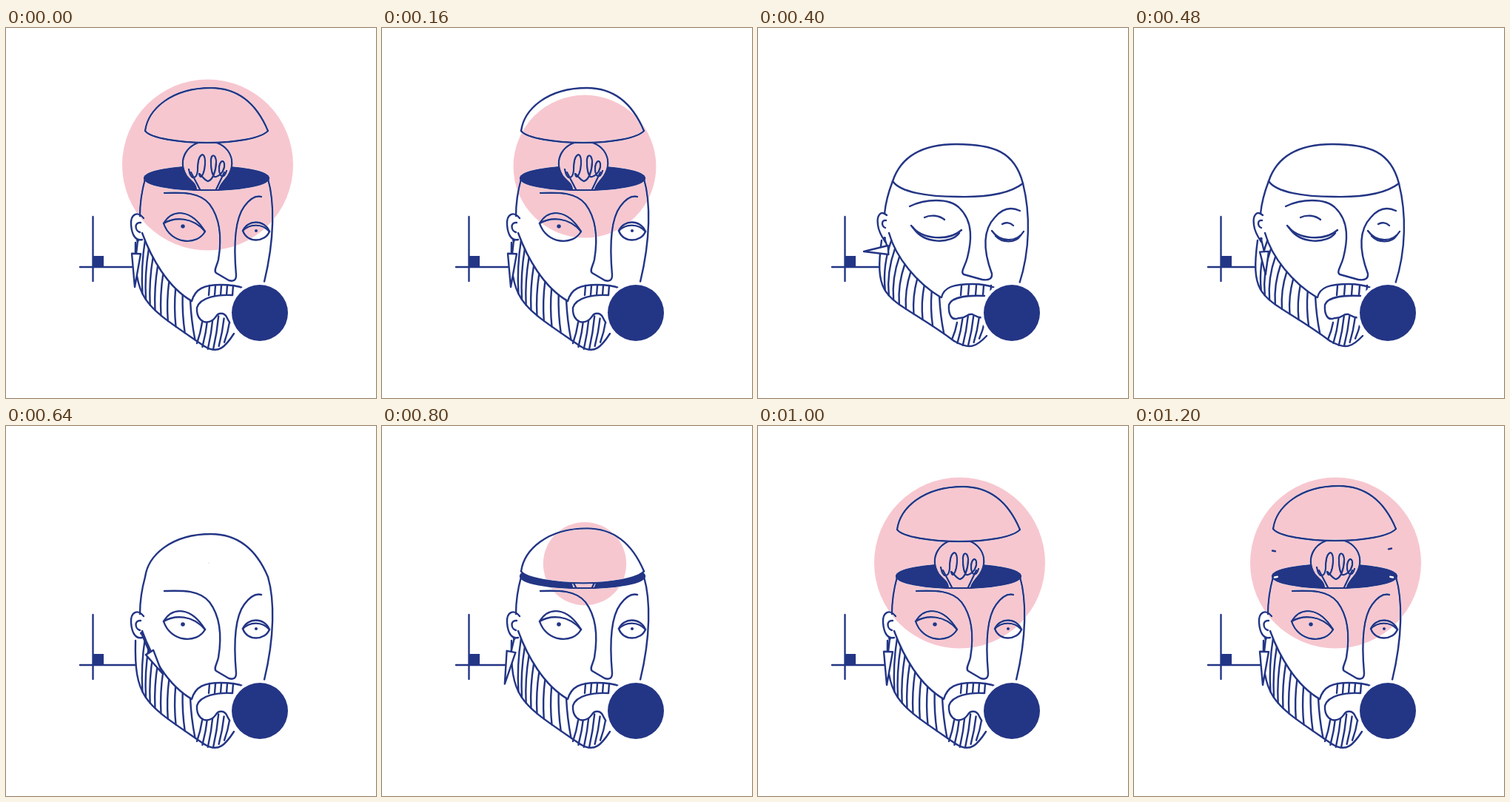
An HTML page with a canvas for the animation above (1.24 s loop, 500x500 px).

```html
<!DOCTYPE html>
<html lang="en">
<head>
<meta charset="utf-8">
<title>Open mind</title>
<style>
html, body { margin: 0; width: 100%; height: 100%; overflow: hidden; background: #fff; }
canvas { display: block; width: 500px; height: 500px; }
</style>
</head>
<body>
<canvas id="stage" width="500" height="500"></canvas>
<script>
const ctx = document.getElementById('stage').getContext('2d');
const NAVY = '#233585', PINK = '#f7c7d0', WHITE = '#fff';
const LOOP = 1240, STEP = 40;

const lerp = (a, b, k) => a + (b - a) * k;
const span = (t, a, b) => Math.min(1, Math.max(0, (t - a) / (b - a)));
const smooth = k => k * k * (3 - 2 * k);
const inOut = k => k < 0.5 ? 2 * k * k : 1 - 2 * (1 - k) * (1 - k);

// Path between two outlines that share the same commands.
function blend(a, b, k) {
  const to = b.match(/[\d.]+/g);
  let i = 0;
  return new Path2D(a.replace(/[\d.]+/g, n => lerp(+n, +to[i++], k)));
}

// [head raised, head lowered]
const DOME = ['M188 139C192 110 223 81 277 81C318 81 341 108 354 139',
              'M182 142C194 106 226 92 268 92C318 92 347 102 358 145'];
const SEAM = ['C345 149 310 155 272 155C235 155 195 149 188 139',
              'C340 159 310 164 270 163C230 163 192 157 182 142'];
const RIM = ['M354 139', 'M358 145'];
const LINES = [
  // sides of the face
  ['M188 204C183 222 181 240 181 254', 'M182 207C175 225 172 240 171 251'],
  ['M354 204C363 235 363 285 349 343', 'M358 210C368 250 368 300 353 346'],
  // brows and nose
  ['M214 223C240 222 262 222 275 238C293 262 290 295 287 313C285 322 280 328 284 331L301 341Q311 344 311 334C308 300 308 260 322 241Q334 225 345 228',
   'M205 241C225 231 258 229 272 243C292 262 288 290 283 310C280 322 273 330 278 333L303 340Q317 342 316 332C306 305 302 275 320 256Q335 238 354 247'],
  // left eye
  ['M213 264C225 244 250 244 269 275', 'M225 256C233 252 245 253 252 259'],
  ['M213 264C228 255 252 255 269 275', 'M207 267C222 287 258 288 275 273'],
  ['M213 264C222 292 258 295 269 275', 'M209 269C225 294 262 291 272 277'],
  // right eye
  ['M320 274C326 259 349 258 356 275', 'M330 265C335 262 341 263 345 267'],
  ['M320 274C330 264 346 264 356 275', 'M316 274C327 290 350 290 359 275'],
  ['M320 274C326 291 350 290 356 275', 'M321 281C330 291 348 291 355 280'],
  // ear
  ['M186 257C178 247 168 251 169 266C170 278 174 288 184 286', 'M174 253C166 246 160 253 162 266C163 276 168 283 172 289'],
  ['M182 263C173 262 174 274 181 276', 'M173 260C166 259 167 268 172 270']
];
const MOUTH = ['M306 361C285 360 262 364 258 378C257 392 266 401 277 396C285 393 283 384 293 386C300 388 298 395 303 398',
               'M306 362C285 361 262 363 258 374C257 388 262 396 271 392C282 393 282 385 290 387C296 390 298 392 304 391'];
const MOUSTACHE = ['M251 369C256 352 268 347 290 347C305 347 315 349 322 352',
                   'M248 364C251 350 265 346 290 346C305 346 312 348 320 351'];
const BEARD = ['M184 277C196 310 218 350 251 369L308 380L308 413C297 430 287 442 268 430C190 376 173 372 175 290Z',
               'M177 277C186 310 215 345 247 364L308 380L309 416C295 431 286 435 265 423C180 360 155 375 167 287Z'];
const INNER = [[184, 277, 196, 310, 218, 350, 251, 369], [177, 277, 186, 310, 215, 345, 247, 364]];
const OUTER = [[175, 290, 173, 372, 190, 376, 268, 430], [167, 287, 155, 375, 180, 360, 265, 423]];
const CHIN = ['M308 413C297 430 287 442 268 430', 'M309 416C295 431 286 435 265 423'];

// time, then pivot, joint and tip of the earring
const SWING = [
  [0, 178, 287, 176, 305, 174, 350],
  [160, 178, 287, 176, 305, 174, 350],
  [280, 171, 284, 176, 303, 175, 357],
  [400, 171, 284, 176, 300, 143, 302],
  [520, 172, 285, 176, 303, 190, 344],
  [640, 183, 280, 194, 306, 211, 334],
  [760, 179, 287, 174, 305, 163, 348],
  [880, 178, 287, 176, 305, 174, 350],
  [LOOP, 178, 287, 176, 305, 174, 350]
];

function bez(c, t) {
  const u = 1 - t, w = [u * u * u, 3 * u * u * t, 3 * u * t * t, t * t * t];
  return [0, 1].map(d => w.reduce((s, v, i) => s + v * c[2 * i + d], 0));
}
const stroke = p => ctx.stroke(typeof p === 'string' ? new Path2D(p) : p);
const both = (pair, k) => blend(pair[0], pair[1], k);
function fill(p, color) { ctx.fillStyle = color; ctx.fill(p); }
function disc(x, y, r, color) {
  ctx.fillStyle = color;
  ctx.beginPath();
  ctx.arc(x, y, r, 0, 7);
  ctx.fill();
}
const line = (x1, y1, x2, y2) => stroke(`M${x1} ${y1}L${x2} ${y2}`);

function crosshair() {
  line(117.5, 255, 117.5, 342);
  line(100, 323, 176, 323);
  ctx.fillStyle = NAVY;
  ctx.fillRect(117, 308, 15, 15);
}

function drawBeard(k) {
  fill(both(BEARD, k), WHITE);
  const edge = pair => pair[0].map((v, i) => lerp(v, pair[1][i], k));
  const inner = edge(INNER), outer = edge(OUTER);
  for (const c of [inner, outer]) stroke(`M${c.slice(0, 2)}C${c.slice(2)}`);
  stroke(both(CHIN, k));
  for (let i = 0; i < 9; i++) {
    const [x1, y1] = bez(inner, 0.1 + i * 0.11);
    const [x2, y2] = bez(outer, 0.4 + i * 0.068);
    const bow = 2 + (1 - i / 8) * (2 + 4 * k);
    stroke(`M${x1} ${y1}Q${(x1 + x2) / 2 - bow} ${(y1 + y2) / 2} ${x2} ${y2}`);
  }
  for (let i = 0; i < 6; i++) {
    const x = 265 + i * 7.4 + k * 4, y = 398 - 9 * Math.sin(i * 0.62);
    const end = 426 + 8 * Math.sin(i * 0.66) - 5 * k;
    stroke(`M${x} ${y}Q${x - 2} ${(y + end) / 2} ${x - 7} ${end}`);
  }
  stroke(both(MOUSTACHE, k));
  for (let i = 0; i < 5; i++) {
    const x = 275 + i * (8 + 2 * k);
    line(x, 348, x - 1, 361);
  }
  const mouth = both(MOUTH, k);
  fill(mouth, WHITE);
  stroke(mouth);
}

function earring(t) {
  const n = SWING.findIndex(s => s[0] > t);
  const a = SWING[n - 1], b = SWING[n];
  const e = smooth(span(t, a[0], b[0]));
  const [, px, py, jx, jy, tx, ty] = a.map((v, i) => lerp(v, b[i], e));
  const d = Math.hypot(tx - jx, ty - jy);
  const nx = (ty - jy) / d * 6, ny = (jx - tx) / d * 6;
  line(px, py, jx, jy);
  const spike = new Path2D(`M${jx + nx} ${jy + ny}L${jx - nx} ${jy - ny}L${tx} ${ty}Z`);
  fill(spike, WHITE);
  stroke(spike);
  disc(px, py, 2, NAVY);
}

function cavity(k) {
  ctx.fillStyle = NAVY;
  ctx.beginPath();
  ctx.ellipse(271 - k, 203 + 5 * k, 84 + 3 * k, 16, 0, 0, 7);
  ctx.fill();
  ctx.stroke();
  const bulb = new Path2D('M257 218C256 209 250 208 244 200C230 178 246 153 272 153C299 153 314 178 300 200C295 207 290 211 288 218');
  fill(bulb, WHITE);
  stroke(bulb);
  stroke('M247 191C250 207 258 204 259 192C259 168 269 166 269 180C269 195 264 204 262 200' +
         'C258 190 268 207 273 207C280 205 284 192 284 180C283 169 276 170 277 182' +
         'C277 194 280 203 284 201C292 198 296 190 295 183C293 176 288 182 288 190C288 202 295 204 298 193');
  stroke('M250 195L262 218M295 195L284 218');
}

function lid(k, lift) {
  ctx.save();
  ctx.translate(0, 65 * (1 - lift));
  fill(blend(DOME[0] + SEAM[0], DOME[1] + SEAM[1], k), WHITE);
  stroke(both(DOME, k));
  if (lift > 0 || k > 0.3) stroke(blend(RIM[0] + SEAM[0], RIM[1] + SEAM[1], k));
  ctx.restore();
}

function glow(r) {
  if (r <= 0) return;
  const off = Math.min(1, (1 - r) * 6);
  ctx.globalCompositeOperation = 'darken';
  disc(272.5 + 1.5 * off, 185 + 2.5 * off * r, 115.5 * r, PINK);
  ctx.globalCompositeOperation = 'source-over';
}

function rays(t) {
  const head = smooth(span(t, 1020, 1140)), tail = smooth(span(t, 1080, 1240));
  if (head <= tail || tail >= 1) return;
  const ray = (x1, y1, x2, y2, color) => {
    ctx.strokeStyle = color;
    line(lerp(x1, x2, tail), lerp(y1, y2, tail), lerp(x1, x2, head), lerp(y1, y2, head));
  };
  ray(212, 173, 187, 168.5, NAVY);
  ray(322, 171, 348, 165.5, NAVY);
  ray(214, 200, 190, 204.5, WHITE);
  ray(326, 200, 350, 204.5, WHITE);
}

function draw(t) {
  const k = smooth(span(t, 180, 280)) * (1 - smooth(span(t, 480, 600)));
  const lift = t < 500 ? 1 - inOut(span(t, 160, 275)) : smooth(span(t, 740, 1020));
  const r = t < 500 ? 1 - Math.pow(span(t, 40, 280), 2.6) : inOut(span(t, 620, 985));

  ctx.fillStyle = WHITE;
  ctx.fillRect(0, 0, 500, 500);
  ctx.strokeStyle = NAVY;
  ctx.lineWidth = 2.4;
  ctx.lineCap = ctx.lineJoin = 'round';

  crosshair();
  drawBeard(k);
  for (const pair of LINES) stroke(both(pair, k));
  if (k < 0.5) {
    disc(239, 268, 2.8, NAVY);
    disc(338, 274, 2.1, NAVY);
  }
  earring(t);
  if (lift > 0) cavity(k);
  lid(k, lift);
  glow(r);
  rays(t);
  disc(343, 385, 42, WHITE);
  disc(343, 385, 38, NAVY);
}

const start = performance.now();
function tick() {
  const t = (performance.now() - start) % LOOP;
  draw(Math.floor(t / STEP) * STEP);
  requestAnimationFrame(tick);
}
tick();
</script>
</body>
</html>
```
